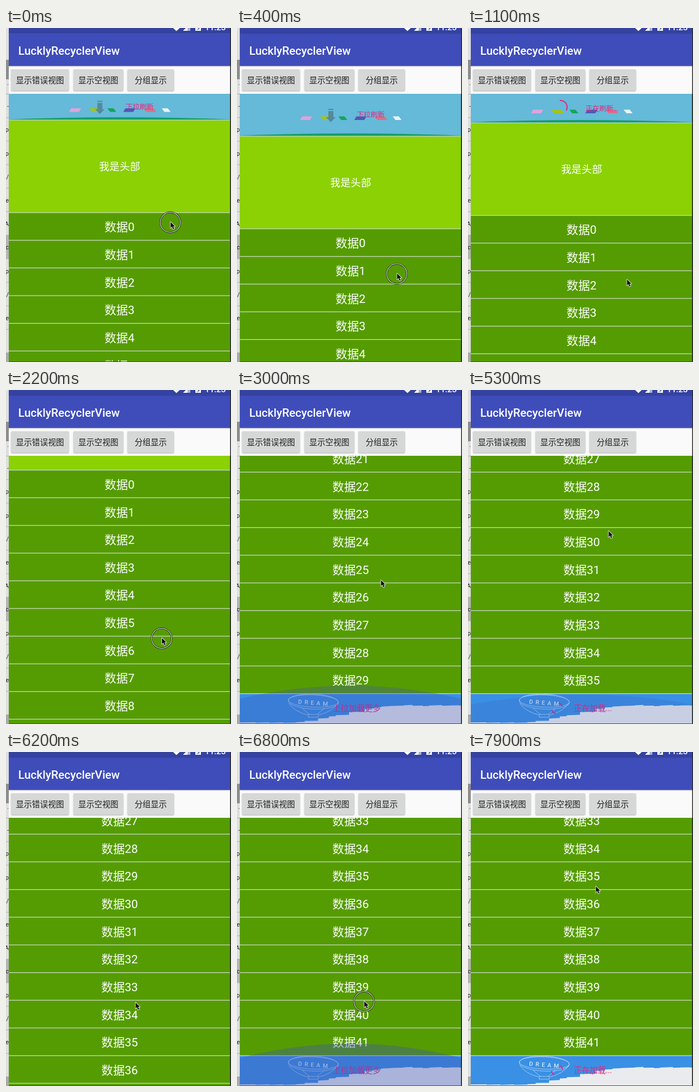
These frames come from a looping animation (404 px wide and 599 px high, 8 s). An HTML page with a canvas:

```html
<!DOCTYPE html>
<html lang="zh">
<head>
<meta charset="utf-8">
<title>LucklyRecyclerView</title>
<style>
html, body { margin: 0; width: 100%; height: 100%; overflow: hidden; background: #fafafa; }
canvas { display: block; }
</style>
</head>
<body>
<canvas id="stage" width="404" height="599"></canvas>
<script>
const ctx = document.getElementById('stage').getContext('2d');
const W = 404, H = 599, LOOP = 8000, STEP = 100;
const LEFT = 5, RIGHT = 402.5, WIDTH = RIGHT - LEFT, MID = 204, TOP = 118;
const HEAD = 166, ROW = 49.65, FOOT = 54.5, PAGE = 6;
const FONT = 'Roboto, "Noto Sans CJK SC", "Noto Sans CJK", sans-serif';
const PINK = '#e8257f', LINE = '#c9d9bc';

const LOAD_STARTS = [3600, 5150, 7150], LOAD_TIME = 1050;
const GLOW_PEAKS = [3040, 3550, 5100, 6800];
// Pointer stops: time, x, y. Upward moves are swipes.
const STOPS = [[0, 295, 347], [500, 286, 450], [1100, 285, 450], [2000, 282, 456], [3000, 258, 340],
  [3250, 245, 450], [3600, 230, 330], [4400, 224, 411], [4800, 235, 450], [5300, 252, 252],
  [6250, 232, 450], [6500, 230, 330], [6800, 228, 446], [7200, 229, 240], [LOOP, 229, 240]];

// Eased progress from 0 at time a to 1 at time b
function ramp(t, a, b) {
  const k = Math.min(1, Math.max(0, (t - a) / (b - a)));
  return k * k * (3 - 2 * k);
}

function random(seed) {
  return () => (seed = (seed * 16807) % 2147483647) / 2147483647;
}

const pullAt = t => 47 + 30 * ramp(t, 0, 450) - 25 * ramp(t, 550, 700) - 52 * ramp(t, 1750, 1950);

const scrollAt = t => LOAD_STARTS.reduce(
  (sum, s) => sum + PAGE * ROW * ramp(t, s + LOAD_TIME + 100, s + LOAD_TIME + 400),
  1229 * ramp(t, 2000, 2950));

const countAt = t => 30 + PAGE * LOAD_STARTS.filter(s => t >= s + LOAD_TIME).length;

const loadingAt = t => LOAD_STARTS.some(s => t >= s && t < s + LOAD_TIME);

const glowAt = t => Math.max(0, ...GLOW_PEAKS.map(p => 1 - (t < p ? (p - t) / 250 : (t - p) / 400)));

function rect(x, y, w, h, color) {
  ctx.fillStyle = color;
  ctx.fillRect(x, y, w, h);
}

function poly(points, color) {
  ctx.fillStyle = color;
  ctx.beginPath();
  points.forEach(([x, y]) => ctx.lineTo(x, y));
  ctx.closePath();
  ctx.fill();
}

// Area between a symmetric arch and a flat base
function arch(edge, peak, base, color) {
  ctx.fillStyle = color;
  ctx.beginPath();
  ctx.moveTo(LEFT, edge);
  ctx.quadraticCurveTo(MID, 2 * peak - edge, RIGHT, edge);
  ctx.lineTo(RIGHT, base);
  ctx.lineTo(LEFT, base);
  ctx.fill();
}

// y is the visual middle of the glyphs
function label(text, x, y, size, color, align = 'center', weight = 400) {
  ctx.font = `${weight} ${size}px ${FONT}`;
  ctx.textAlign = align;
  ctx.fillStyle = color;
  ctx.fillText(text, x, y + size * .36);
}

function arc(x, y, r, from, sweep) {
  const rad = Math.PI / 180;
  ctx.strokeStyle = PINK;
  ctx.lineWidth = 2;
  ctx.beginPath();
  ctx.arc(x, y, r, from * rad, (from + sweep) * rad);
  ctx.stroke();
}

function clipBox(x, y, w, h, draw) {
  ctx.save();
  ctx.beginPath();
  ctx.rect(x, y, w, h);
  ctx.clip();
  draw();
  ctx.restore();
}

function drawRefresh(t, h) {
  const cy = TOP + h / 2, bottom = TOP + h;
  clipBox(LEFT, TOP, WIDTH, h, () => {
    rect(LEFT, TOP, WIDTH, h, '#65b9d9');
    arch(bottom - 1, bottom - 5, bottom, '#12a06c');
    ['#dfa3dc', '#9fc41e', '#14a55c', '#5356b4', '#dc7088', '#e9f3f5'].forEach((color, i) => {
      const x = 117 + i * 32.5, w = i % 3 === 2 ? 15 : 22, lean = i % 3 ? 5 : -4, y = cy + 5.5;
      poly([[x, y - 3], [x + w - 4, y - 3], [x + w - 4 + lean, y + 3.5], [x + lean, y + 3.5]], color);
    });
    if (t < 650) {
      const gray = '#54899c';
      rect(164, cy - 11, 9, 2, gray);
      rect(164, cy - 7, 9, 11, gray);
      poly([[160, cy + 4], [177, cy + 4], [168.5, cy + 13]], gray);
      label('下拉刷新', 215, cy, 12.5, PINK, 'left');
    } else {
      arc(166, cy - 2, 12, -95 + (t - 1100) * .4, 125);
      label('正在刷新...', 211, cy, 12.5, PINK, 'left');
    }
  });
  rect(LEFT, bottom - .5, WIDTH, 1.3, LINE);
}

function drawWall(top) {
  const rnd = random(7), edge = [];
  for (let x = LEFT; x < W;) {
    const y = top + 51.5 - 31 * ramp(x, 70, 290) + rnd() * 2, next = x + 10 + rnd() * 20;
    edge.push([x, y], [next, y - rnd()]);
    x = next;
  }
  poly([...edge, [W, H + 60], [LEFT, H + 60]], '#e9ebee');
}

function drawBalloon(x, y) {
  ctx.save();
  ctx.translate(x, y);
  ctx.strokeStyle = 'rgba(225,240,255,.6)';
  ctx.lineWidth = 1;
  for (const [dy, ry] of [[0, 13.5], [-1, 11]]) {
    ctx.beginPath();
    ctx.ellipse(0, dy, 45, ry, .04, 0, Math.PI * 2);
    ctx.stroke();
  }
  ctx.beginPath();
  for (const side of [-1, 1]) {
    ctx.moveTo(side * 44, 3);
    ctx.quadraticCurveTo(side * 34, 18, side * 10, 24);
    ctx.moveTo(side * 20, 12);
    ctx.lineTo(side * 7, 23);
  }
  ctx.rect(-9, 23, 18, 5);
  ctx.stroke();
  ctx.rotate(.08);
  ctx.letterSpacing = '4.5px';
  label('DREAM', 2, 2, 10.5, 'rgba(240,248,255,.85)', 'center', 500);
  ctx.restore();
}

function drawFooter(t, y) {
  clipBox(LEFT, y, WIDTH, FOOT, () => {
    rect(LEFT, y, WIDTH, FOOT, '#3990e4');
    drawWall(y);
    drawBalloon(137, y + 14);
    if (loadingAt(t)) {
      const angle = -92 + (t - 4400) * .421;
      arc(160, y + 26, 10, angle, 52);
      arc(160, y + 26, 10, angle + 180, 52);
      label('正在加载...', 190, y + 26.5, 14.3, PINK, 'left');
    } else {
      label('上拉加载更多', 172, y + 26.5, 14.3, PINK, 'left');
    }
  });
}

function drawGlow(t) {
  const g = glowAt(t), h = 30 + 46 * g;
  if (g > 0) arch(H - h * .66, H - h, H, `rgba(63,81,181,${.37 * g})`);
}

function drawList(t) {
  const pull = pullAt(t), y0 = TOP + pull - scrollAt(t), count = countAt(t);
  const foot = y0 + HEAD + count * ROW;
  clipBox(LEFT, TOP, WIDTH, H - TOP, () => {
    rect(LEFT, TOP, WIDTH, H, '#559c02');
    if (foot < H) drawFooter(t, foot + .3);
    rect(LEFT, y0, WIDTH, HEAD, '#8bd103');
    label('我是头部', MID, y0 + 83.5, 18.4, '#fff');
    rect(LEFT, y0 + HEAD - .5, WIDTH, 1.3, LINE);
    for (let i = 0; i < count; i++) {
      const y = y0 + HEAD + i * ROW;
      if (y > H || y + ROW < TOP) continue;
      label('数据' + i, MID, y + 25.8, 21, '#fff');
      rect(LEFT, y + ROW - .6, WIDTH, 1.3, LINE);
    }
    if (pull > 0) drawRefresh(t, pull);
    drawGlow(t);
  });
}

function drawButton(x, w, text) {
  ctx.save();
  ctx.shadowColor = 'rgba(0,0,0,.3)';
  ctx.shadowBlur = 2;
  ctx.shadowOffsetY = 1;
  ctx.fillStyle = '#d6d7d7';
  ctx.beginPath();
  ctx.roundRect(x, 74, w, 38.5, 2);
  ctx.fill();
  ctx.restore();
  label(text, x + w / 2, 93.5, 14.4, '#1c1c1c');
}

function drawBars() {
  rect(LEFT, 0, W, 10.5, '#3542a0');
  rect(LEFT, 10.5, W, 58, '#3f4dba');
  label('LucklyRecyclerView', 22, 41, 20.5, '#fff', 'left', 500);
  rect(LEFT, 68, W, 50, '#fafafa');
  rect(LEFT, 68, W, 1.5, '#c9cad2');
  drawButton(9, 104, '显示错误视图');
  drawButton(121, 89.5, '显示空视图');
  drawButton(218, 83.5, '分组显示');
  poly([[300, 0], [312, 0], [306, 5.5]], '#fff');
  poly([[318, 5], [331, 5], [331, 0], [323, 0]], '#a9b0d8');
  poly([[318, 5], [326, 5], [326, 0], [323, 0]], '#fff');
  rect(340, 0, 10, 5, '#fff');
  poly([[346, 0], [348, 0], [344, 4], [344, 2]], '#3542a0');
  label('11:23', 357, -1, 14.8, '#fff', 'left', 500);
}

function drawBehind() {
  rect(0, 0, LEFT, H, '#dedede');
  rect(0, 57, LEFT, 35, '#8d8d8d');
  rect(0, 371, LEFT, 43, '#b4b4b4');
  rect(0, 582, LEFT, 17, '#a9a9a9');
  clipBox(0, 0, LEFT, H, () => {
    [...'.-pp/eAcp/e'].forEach((c, i) => {
      const y = 98 + i * 42.2;
      rect(0, y + 20, LEFT, 1, '#b0b0b0');
      label(c, 5, y, 11, '#222', 'right');
    });
  });
}

function drawPointer(t) {
  const i = STOPS.findIndex(s => s[0] > t);
  const [t0, x0, y0] = STOPS[i - 1], [t1, x1, y1] = STOPS[i];
  const k = ramp(t, t0, t1), x = x0 + (x1 - x0) * k, y = y0 + (y1 - y0) * k;
  const touching = i === 1 || y1 < y0;
  if (touching) {
    for (const [color, width] of [['rgba(20,20,20,.85)', 2.8], ['#e4e8e0', 1.1]]) {
      ctx.strokeStyle = color;
      ctx.lineWidth = width;
      ctx.beginPath();
      ctx.arc(x, y + 1.5, 18, 0, Math.PI * 2);
      ctx.stroke();
    }
  }
  ctx.save();
  ctx.translate(x + .5, y + 1);
  ctx.scale(.85, .85);
  ctx.beginPath();
  [[0, 0], [0, 12.5], [3, 9.8], [5.2, 15], [7.6, 14], [5.4, 9], [9.2, 9]].forEach(([px, py]) => ctx.lineTo(px, py));
  ctx.closePath();
  ctx.lineJoin = 'round';
  ctx.strokeStyle = '#eee';
  ctx.lineWidth = 2;
  ctx.stroke();
  ctx.fillStyle = '#111';
  ctx.fill();
  ctx.restore();
}

function render(t) {
  drawBehind();
  drawList(t);
  drawBars();
  rect(RIGHT, 0, W - RIGHT, H, '#2b2b2b');
  rect(LEFT, H - 1, W, 1, '#4a4a4a');
  drawPointer(t);
}

const start = performance.now();
function frame() {
  const t = Math.max(0, performance.now() - start) % LOOP;
  render(Math.floor(t / STEP) * STEP);
  requestAnimationFrame(frame);
}
frame();
</script>
</body>
</html>
```
